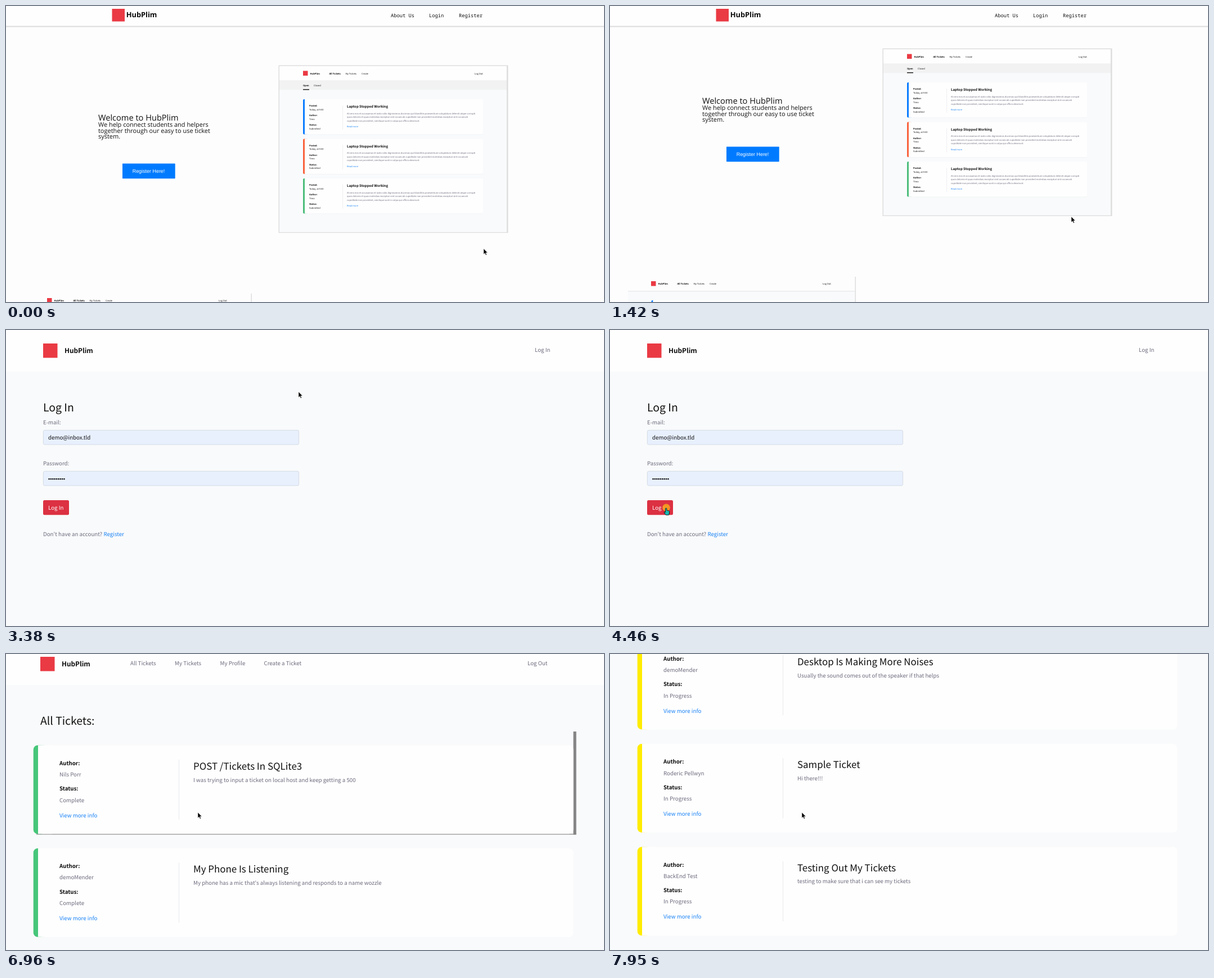
Recreate the animation shown at these times as an HTML page. Size 1063x527 px, loop 8 s.

```html
<!DOCTYPE html>
<html lang="en">
<head>
<meta charset="utf-8">
<title>Ticket desk walkthrough</title>
<style>
  html, body { margin: 0; width: 100%; height: 100%; overflow: hidden; background: #fdfdfd; }
  svg { display: block; width: 1063px; height: 527px; }
  text { font: 9.73px "Noto Sans CJK JP", "Noto Sans CJK SC", "Open Sans", sans-serif; fill: #6c6b7e; text-rendering: geometricPrecision; white-space: pre; }
  .bold { font-weight: 700; fill: #0c0c0c; }
  .dark { fill: #111; }
  .link { fill: #1a83f5; }
  .white { fill: #fff; }
  .wide { font-family: "Open Sans", "Noto Sans", sans-serif; }
  .nav { font: 500 8.75px "Noto Sans Mono", "DejaVu Sans Mono", monospace; fill: #111; }
  .nav.hot { fill: #e0333c; }
  .button { font: 8.95px "Liberation Sans", Arial, sans-serif; fill: #fff; }
  .status { font-size: 6.43px; fill: #b4b4b4; }
</style>
</head>
<body>
<svg id="stage" viewBox="0 0 1063 527" xmlns="http://www.w3.org/2000/svg"></svg>
<script>
const BRAND = "HubPlim", RED = "#ea3a44", GREEN = "#47c67a", YELLOW = "#ffec00";
const HOST = "dev-queue.marlowined.now.sh";
const LOOP = 8000, TICK = 108.7;

// --- drawing helpers
const text = (x, y, s, cls = "", size = 0) =>
  `<text x="${x}" y="${y}" class="${cls}"${size ? ` style="font-size:${size}px"` : ""}>${s}</text>`;
const rect = (x, y, w, h, fill, r = 0, extra = "") =>
  `<rect x="${x}" y="${y}" width="${w}" height="${h}" rx="${r}" fill="${fill}" ${extra}/>`;
const group = (id, body) => `<g id="${id}">${body}</g>`;

// white card with a coloured strip on its rounded left edge
const panel = (x, y, w, h, strip, r, color) =>
  rect(x, y, strip * 3, h, color, r) +
  rect(x + strip, y, strip * 3, h, "#fefefe") +
  rect(x + strip, y, w - strip, h, "#fefefe", r);

// --- landing page
const LOREM = [
  "At vero eos et accusamus et iusto odio dignissimos ducimus qui blanditiis praesentium voluptatum deleniti atque corrupti",
  "quos dolores et quas molestias excepturi sint occaecati cupiditate non provident molestias excepturi sint occaecati",
  "cupiditate non provident, similique sunt in culpa qui officia deserunt."
];

function miniCard(x, y, color) {
  const facts = ["Posted:", "Today, at 9:00", "Author:", "Timo", "Status:", "Submitted"];
  return rect(x, y + .6, 320, 62.6, "#f0f1f3", 2) + panel(x, y, 320, 62.5, 3, 2, color) +
    facts.map((s, i) => text(x + 11, y + 13 + (i >> 1) * 17.1 + (i % 2) * 6.5, s, i % 2 ? "dark" : "bold", 4)).join("") +
    rect(x + 70, y + 11, .7, 43, "#e9e9ec") +
    text(x + 78, y + 15.2, "Laptop Stopped Working", "bold", 6) +
    LOREM.map((s, i) => text(x + 78, y + 26.7 + i * 6.5, s, "", 4.05)).join("") +
    text(x + 78, y + 50.3, "Read more", "link", 4);
}

const miniHeader = (x, y) =>
  rect(x, y, 8.5, 8.5, RED) +
  text(x + 12.5, y + 6, BRAND, "bold", 4.05) +
  text(x + 46.5, y + 6, "All Tickets", "bold", 4.05) +
  text(x + 75.5, y + 6, "My Tickets", "dark", 4) +
  text(x + 104, y + 6, "Create", "dark", 4) +
  text(x + 305, y + 6, "Log Out", "dark", 4.07);

const hero =
  rect(484.5, 105.5, 408, 298.5, "#dedede") +
  rect(486, 107, 404, 295.7, "#f8fafc") +
  rect(486, 107, 404, 25.5, "#fefefe") +
  rect(486, 132.3, 404, 17, "#f2f2f2") +
  miniHeader(528, 115.5) +
  text(528, 142.6, "Open", "bold", 4.05) + text(547, 142.6, "Closed", "dark", 4.05) +
  rect(528, 148, 11, 1.5, "#222") +
  ["#0a7cff", "#f9633c", "#4bbd7a"].map((c, i) => miniCard(528, 166 + i * 70.5, c)).join("") +
  text(164, 204, "Welcome to " + BRAND, "dark wide", 14.6) +
  ["We help connect students and helpers", "together through our easy to use ticket", "system."]
    .map((s, i) => text(164, 215.2 + i * 10.6, s, "dark wide", 10.98)).join("") +
  rect(207, 280.5, 93.7, 26.7, "#007bff", .7) + text(224.7, 296.7, "Register Here!", "button");

const second =
  rect(32, 538, 404, 268, "#f8fafc") + rect(32, 537, 404, 1.5, "#ebecee") +
  rect(435.5, 512, 1.5, 295, "#dedede") + rect(32, 805.5, 405, 1.5, "#dedede") +
  miniHeader(73, 520) + miniCard(73.5, 554, "#0a7cff");

const landing = group("landing",
  rect(0, 0, 1063, 527, "#fdfdfd") +
  group("landingScroll", hero + second) +
  rect(0, 0, 1063, 38, "#ededed") + rect(0, 0, 1063, 37, "#dcdcdc") + rect(0, 0, 1063, 35.5, "#fefefe") +
  rect(188.5, 5, 22.5, 22.5, RED) + text(213.7, 20.3, BRAND, "bold wide", 12.8) +
  text(684, 20.3, "About Us", "nav") +
  `<text id="navLogin" x="752" y="20.3">Login</text><text id="navRegister" x="805" y="20.3">Register</text>` +
  group("bubble", `<rect id="bubbleBox" x="-4" y="518.4" height="14" rx="2" fill="#3d3d3f"/>
    <text id="bubbleText" class="status wide" x="-3.9" y="526"></text>`));

// --- application pages
const appHeader = x =>
  rect(0, 0, 1063, 74, "#fefefe") + rect(x, 24, 25.5, 25.5, RED) + text(x + 38, 41.2, BRAND, "bold", 11.8);

const field = (y, label) =>
  text(66, y - 10.2, label) +
  rect(66.4, y + .4, 454.2, 25.6, "#e8f0fe", 2.5, 'stroke="#cdd5de" stroke-width=".8"');

const login = group("login",
  rect(0, 0, 1063, 527, "#f9fafb") + appHeader(66) + text(940, 39.3, "Log In") +
  text(66, 145, "Log In", "dark", 19.4) +
  field(178, "E-mail:") + text(75, 194.8, "demo@inbox.tld", "dark") +
  field(251, "Password:") +
  Array.from({ length: 9 }, (_, i) => `<circle cx="${76.6 + i * 3.35}" cy="265.2" r="1.3" fill="#111"/>`).join("") +
  rect(65, 302, 48, 28, "none", 3.5, 'id="ring" stroke="#eda0a8" stroke-width="2"') +
  rect(66, 303, 46, 26.3, "#dc3142", 2.5) + text(75, 319.6, "Log In", "white") +
  text(66, 366.5, `Don't have an account? <tspan class="link">Register</tspan>`));

const tickets = [
  [GREEN, "Nils Porr", "Complete", "POST /Tickets In SQLite3", "I was trying to input a ticket on local host and keep getting a 500"],
  [GREEN, "demoMender", "Complete", "My Phone Is Listening", "My phone has a mic that's always listening and responds to a name wozzle"],
  [YELLOW, "demoMender", "In Progress", "Desktop Is Making More Noises", "Usually the sound comes out of the speaker if that helps"],
  [YELLOW, "Roderic Pellwyn", "In Progress", "Sample Ticket", "Hi there!!!"],
  [YELLOW, "BackEnd Test", "In Progress", "Testing Out My Tickets", "testing to make sure that i can see my tickets"]
];

const ticketCard = ([color, author, state, title, note], i) => {
  const y = 181.5 + i * 183.45;
  return panel(48.7, y, 959.8, 157.7, 8.3, 7.5, color) +
    text(95, y + 35.2, "Author:", "bold") + text(95, y + 55.5, author) +
    text(95, y + 80.8, "Status:", "bold") + text(95, y + 101, state) +
    text(95, y + 128, "View more info", "link") +
    rect(307, y + 25.5, .8, 107, "#e3e4e8") +
    text(333, y + 43.3, title, "dark", 16.9) + text(333, y + 65, note);
};

const list = group("list",
  rect(0, 0, 1063, 527, "#f9fafb") +
  group("listScroll",
    appHeader(61) +
    text(221, 39.3, "All Tickets") + text(300, 39.3, "My Tickets") +
    text(380.5, 39.3, "My Profile") + text(458.5, 39.3, "Create a Ticket") +
    text(927, 39.3, "Log Out") + text(61, 145, "All Tickets:", "dark", 19.4) +
    group("cards",
      rect(1008.5, 157, 5.2, 183.5, "#858585") + rect(54, 339.2, 959.5, 1.3, "#858585") +
      tickets.map(ticketCard).join(""))));

const pointers = `<circle id="click" cx="100" cy="316.3" r="6.7" fill="#f6a21c"/>
  <g id="cursor" stroke-linejoin="round">
    <path id="arrow" d="M0 0V10L2.3 7.9 3.9 11.5 5.5 10.8 3.9 7.3H7Z" fill="#000" stroke="#fff" stroke-width=".5"/>
    <path id="hand" d="M-1.2 1.2a1.2 1.2 0 0 1 2.4 0V4.2L5 5Q6 5.4 6 6.4L5.4 11.3Q5.2 12.3 4.4 12.3H0Q-.8 12.3-1.4 11.3L-3.4 7.8Q-3.6 6.4-2.4 6.6L-1.2 7.6Z" stroke="#000" stroke-width=".8"/>
    <path id="beam" d="M-2-5H2M0-5V5M-2 5H2" fill="none" stroke="#222" stroke-width=".8"/>
  </g>`;

document.getElementById("stage").innerHTML = landing + login + list + pointers;

const el = {};
document.querySelectorAll("[id]").forEach(e => el[e.id] = e);
const show = (e, on) => e.style.display = on ? "" : "none";
const shift = (e, x, y) => e.setAttribute("transform", `translate(${x} ${y})`);
const lastKey = (keys, n) => keys.reduce((a, k) => k[0] <= n ? k : a);

const cursorKeys = [
  [0, 849, 432, "arrow"], [1, 820, 375, "arrow"],
  [16, 819, 290, "arrow"], [17, 822, 130, "arrow"], [18, 826, 40, "arrow"], [19, 826, 15.5, "hand"],
  [21, 797, 16, "arrow"], [22, 772, 16, "hand"], [23, 762.5, 15.5, "hand"],
  [30, 700, 40, "arrow"], [31, 520, 110, "arrow"], [32, 320, 190, "arrow"], [33, 170, 245, "arrow"],
  [34, 120.5, 264.5, "beam"], [38, 112, 290, "arrow"], [39, 99.7, 317, "hand"],
  [47, 99.7, 317, "arrow"], [51, 112, 318, "arrow"], [52, 140, 319, "arrow"], [53, 175, 318, "arrow"],
  [54, 203, 316, "arrow"], [55, 214, 315, "arrow"],
  [61, 250, 304, "arrow"], [62, 310, 288, "arrow"], [63, 341, 282, "arrow"]
];
const landingScrollAt = [15, 70, 135, 200, 240, 230, 185, 130, 75, 30, 8];
const listScrollAt = n => n < 64 ? 0 : 19 + (n - 64) * 552.8 / 9;

function render(t) {
  const n = Math.floor(t / TICK);
  show(el.landing, n < 30);
  show(el.login, n >= 30 && n < 47);
  show(el.list, n >= 47);

  shift(el.landingScroll, 0, -(landingScrollAt[n - 4] || 0));
  const onRegister = n >= 19 && n < 21, onLogin = n >= 22;
  el.navRegister.setAttribute("class", onRegister ? "nav hot" : "nav");
  el.navLogin.setAttribute("class", onLogin ? "nav hot" : "nav");
  show(el.bubble, n >= 19);
  const waiting = n >= 28;
  el.bubbleBox.setAttribute("width", waiting ? 357 : onLogin ? 134 : 142);
  el.bubbleText.textContent = waiting ? `   Waiting for ${HOST}...`
    : `https://${HOST}/${onLogin ? "login" : "register"}`;

  show(el.ring, n >= 42);
  show(el.click, n === 41 || n === 42);
  el.click.setAttribute("opacity", n === 41 ? .88 : .4);

  // the page moves left once the cards bring in a scrollbar
  show(el.cards, n >= 50);
  shift(el.listScroll, n < 50 ? 5 : 0, -listScrollAt(n));

  const [, x, y, shape] = lastKey(cursorKeys, n);
  shift(el.cursor, x, y);
  for (const s of ["arrow", "hand", "beam"]) show(el[s], s === shape);
  el.hand.setAttribute("fill", n === 41 || n === 42 ? "#19b9b4" : "#000");
}

const start = performance.now();
function frame() {
  render((performance.now() - start) % LOOP);
  requestAnimationFrame(frame);
}
frame();
</script>
</body>
</html>
```
